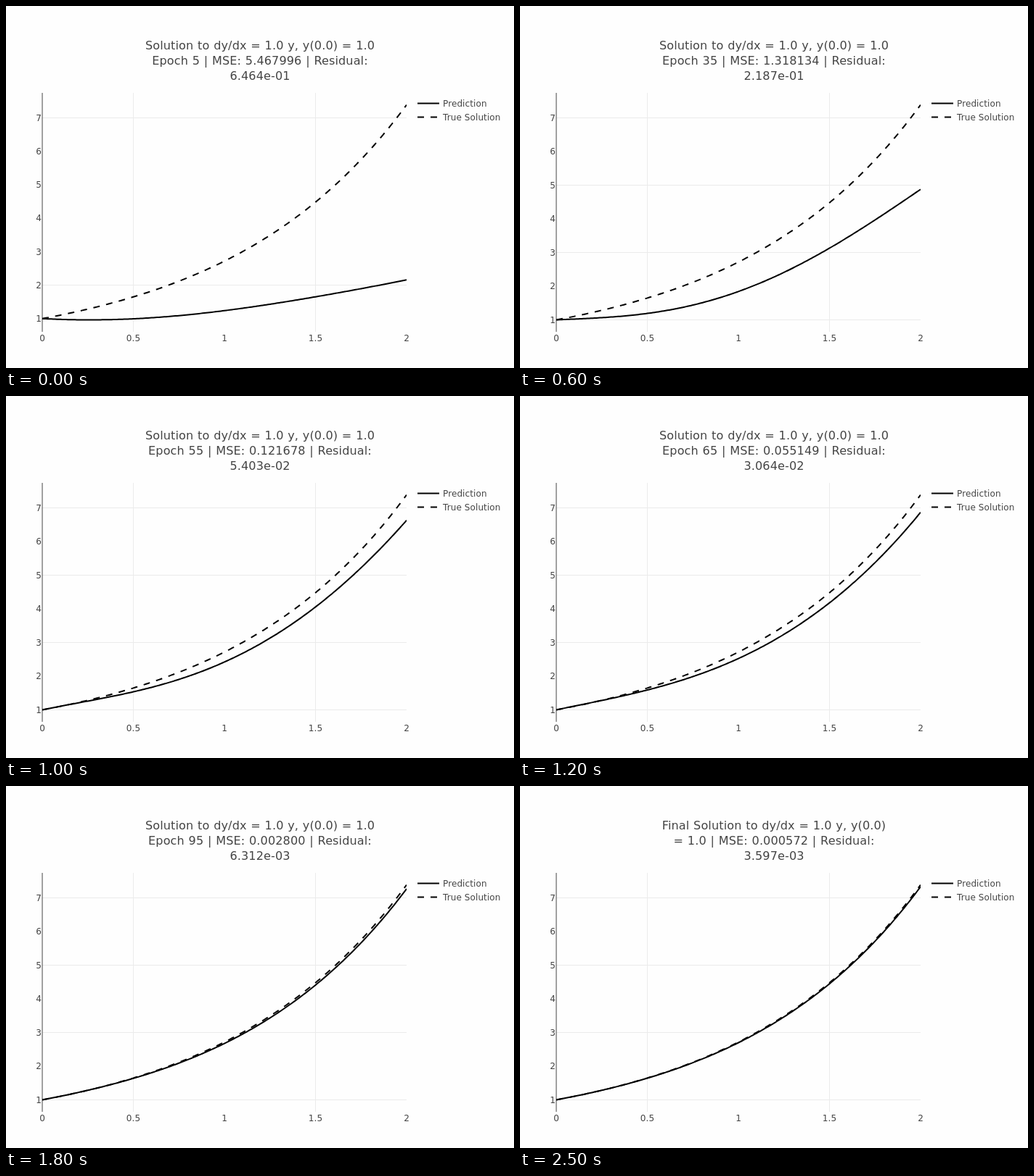
Recreate the animation shown at these times as an HTML page. Size 700 px wide and 500 px high, loop 2600 ms.

```html
<!DOCTYPE html>
<html lang="en">
<head>
<meta charset="utf-8">
<title>Solution to dy/dx = y</title>
<style>
html, body { margin: 0; height: 100%; overflow: hidden; background: #fefefe; }
svg { display: block; width: 700px; height: 500px; }
text { font: 12px Verdana, "DejaVu Sans", sans-serif; fill: #444; letter-spacing: .1px; }
#title text { font-size: 16px; text-anchor: middle; letter-spacing: .15px; word-spacing: .5px; }
#xLabels { text-anchor: middle; }
#yLabels { text-anchor: end; }
#grid { stroke: #ebebeb; }
.line { fill: none; stroke: #000; stroke-width: 2; }
.dash { stroke-dasharray: 9 9; }
</style>
</head>
<body>
<svg viewBox="0 0 700 500">
  <clipPath id="plot"><rect x="50" y="120" width="502" height="330"/></clipPath>
  <path id="grid"/>
  <path d="M50 120V450" stroke="#444"/>
  <g clip-path="url(#plot)">
    <path id="pred" class="line"/>
    <path id="exact" class="line dash"/>
  </g>
  <g id="title"></g>
  <g id="xLabels"></g>
  <g id="yLabels"></g>
  <path class="line" d="M567 134.5h30"/>
  <path class="line dash" d="M567 153.5h30"/>
  <text x="602" y="139">Prediction</text>
  <text x="602" y="158">True Solution</text>
</svg>
<script>
const $ = id => document.getElementById(id);
const LOOP = 2600, STEP = 100, TOP = Math.exp(2);

// Epoch, MSE and residual; both decay geometrically in between
const scores = [
  [5, 5.467996, 0.6464], [20, 2.087419, 0.3869], [35, 1.318134, 0.2187],
  [55, 0.121678, 0.05403], [75, 0.024996, 0.01738], [95, 0.0028, 0.006312],
  [125, 0.000572, 0.003597]
].map(([epoch, ...v]) => [epoch, ...v.map(Math.log)]);

// RMS error, then error / (RMS * x) at x = 0.5, 1, 1.5, 2
const profiles = [
  [0.158, 0.4, 0.8, 0.885, 1.12],
  [0.349, 0.645, 0.85, 0.81, 1.085],
  [1.445, 0.852, 0.73, 0.775, 1.097],
  [2.338, 0.56, 0.633, 0.807, 1.1185]
];

// Linear interpolation between rows by their first value
function mix(rows, key) {
  const next = rows.findIndex(r => r[0] > key);
  const i = next < 0 ? rows.length - 1 : Math.max(next, 1);
  const a = rows[i - 1], b = rows[i];
  const t = Math.min(1, Math.max(0, (key - a[0]) / (b[0] - a[0])));
  return a.slice(1).map((v, k) => v + (b[k + 1] - v) * t);
}

// Cubic through four values at x = 0.5, 1, 1.5, 2
function cubic([a, b, c, d], x) {
  const t = 2 * x - 1;
  return a + t * (b - a) + t * (t - 1) / 2 * (c - 2 * b + a) +
    t * (t - 1) * (t - 2) / 6 * (d - 3 * c + 3 * b - a);
}

const xs = Array.from({ length: 201 }, (_, i) => i / 100);
const ticks = [1, 2, 3, 4, 5, 6, 7];
const px = x => 50 + 251 * x;
const label = (x, y, s) => `<text x="${x}" y="${y}">${s}</text>`;
const exponential = v => v.toExponential(3).replace(/-(\d)$/, '-0$1');
// Grid lines show only where they fall on a whole pixel row
const sharp = p => Math.abs(p % 1 - 0.5) < 0.13;

$('xLabels').innerHTML = [0, 0.5, 1, 1.5, 2].map(x => label(px(x), 463, x)).join('');

function draw(step) {
  const final = step === 25;
  const epoch = Math.min(5 * (step + 1), 125);
  const [mse, residual] = mix(scores, epoch).map(Math.exp);
  const rms = Math.sqrt(mse), profile = mix(profiles, rms);
  const predict = x => Math.exp(x) - rms * x * cubic(profile, x);

  const low = Math.min(...xs.map(predict));
  const py = y => 433.5 - 297 * (y - low) / (TOP - low);
  const curve = f => 'M' + xs.map(x => px(x).toFixed(2) + ' ' + py(f(x)).toFixed(2)).join('L');
  $('pred').setAttribute('d', curve(predict));
  $('exact').setAttribute('d', curve(Math.exp));

  $('yLabels').innerHTML = ticks.map(y => label(49, py(y) + 4.2, y)).join('');
  $('grid').setAttribute('d', 'M175.5 120V450M426.5 120V450' +
    ticks.map(py).filter(sharp).map(p => `M50 ${Math.floor(p) + 0.5}H552`).join(''));

  const result = `| MSE: ${mse.toFixed(6)} | Residual:`;
  const lines = final
    ? ['Final Solution to dy/dx = 1.0 y, y(0.0)', '= 1.0 ' + result]
    : ['Solution to dy/dx = 1.0 y, y(0.0) = 1.0', `Epoch ${epoch} ` + result];
  lines.push(exponential(residual));
  $('title').innerHTML = lines.map((s, i) => label(350, 60 + 20.8 * i, s)).join('');
}

const start = performance.now();
let shown = -1;
function tick() {
  const step = Math.floor((performance.now() - start) % LOOP / STEP);
  if (step !== shown) draw(shown = step);
  requestAnimationFrame(tick);
}
tick();
</script>
</body>
</html>
```
